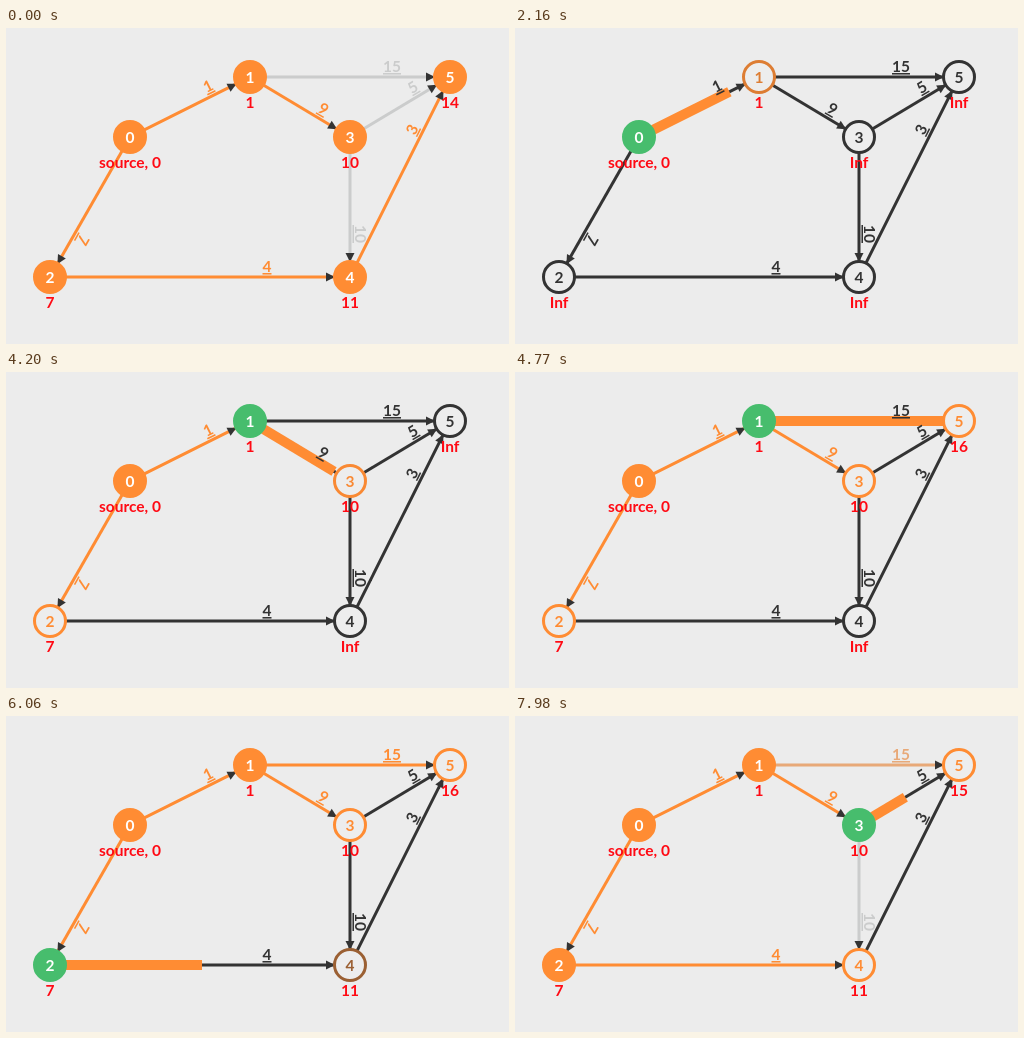
These frames come from a looping animation (503 px wide and 316 px high, 8 s). An HTML page:

```html
<!DOCTYPE html>
<html lang="en">
<head>
<meta charset="utf-8">
<title>Shortest paths</title>
<style>
  html, body { margin: 0; width: 100%; height: 100%; overflow: hidden; background: #ececec; }
  svg { display: block; width: 503px; height: 316px; }
  text { font: bold 15.5px Lato, "Open Sans", sans-serif; text-anchor: middle; }
  .weight { text-decoration: underline; }
  .dist { fill: #ff0a14; }
</style>
</head>
<body>
<svg id="stage" viewBox="0 0 503 316"></svg>
<script>
const LOOP = 8000, RESET = 930, SPAN = 400, RADIUS = 16;
const BG = [237, 237, 237], DARK = [51, 51, 51], ORANGE = [255, 140, 51];
const GREEN = [71, 189, 109], GREY = [203, 204, 204], WHITE = [255, 255, 255];

// inside, ring, digit
const LOOK = {
  plain: [BG, DARK, DARK],
  queued: [BG, ORANGE, ORANGE],
  active: [GREEN, GREEN, WHITE],
  done: [ORANGE, ORANGE, WHITE]
};

const points = [[124, 109], [244, 49], [44, 249], [344, 109], [344, 249], [444, 49]];
const links = [[0, 1, 1], [0, 2, 7], [1, 3, 9], [1, 5, 15], [2, 4, 4], [3, 4, 10], [3, 5, 5], [4, 5, 3]];
const finalDist = ["source, 0", 1, 7, 10, 11, 14];
const finalGrey = [3, 5, 6];

// node: [index, look]; grow: [edge, colour afterwards]; dist: [node, value]; fade: edge turned grey
const steps = [
  { at: 1400, node: [0, "active"] },
  { at: 1900, grow: [0, ORANGE], node: [1, "queued"], dist: [1, 1] },
  { at: 2430, grow: [1, ORANGE], node: [2, "queued"], dist: [2, 7] },
  { at: 2930, node: [0, "done"] },
  { at: 3390, node: [1, "active"] },
  { at: 3880, grow: [2, ORANGE], node: [3, "queued"], dist: [3, 10] },
  { at: 4380, grow: [3, ORANGE], node: [5, "queued"], dist: [5, 16] },
  { at: 4870, node: [1, "done"] },
  { at: 5360, node: [2, "active"] },
  { at: 5860, grow: [4, ORANGE], node: [4, "queued"], dist: [4, 11] },
  { at: 6350, node: [2, "done"] },
  { at: 6830, node: [3, "active"] },
  { at: 7300, grow: [5, GREY] },
  { at: 7788, grow: [6, ORANGE], dist: [5, 15], fade: 3 }
];

const stage = document.getElementById("stage");

function add(tag, attrs, parent = stage) {
  const el = document.createElementNS("http://www.w3.org/2000/svg", tag);
  for (const key in attrs) el.setAttribute(key, attrs[key]);
  return parent.appendChild(el);
}

const rgb = c => `rgb(${c.map(Math.round)})`;
const mix = (a, b, k) => a.map((v, i) => v + (b[i] - v) * k);
const ease = k => k <= 0 ? 0 : k >= 1 ? 1 : k < 0.5 ? 4 * k ** 3 : 1 - 4 * (1 - k) ** 3;

// Each edge is drawn along its own x axis, starting at the rim of its first node.
const edges = links.map(([from, to, weight]) => {
  const [x, y] = points[from], [u, v] = points[to];
  const angle = Math.atan2(v - y, u - x);
  const length = Math.hypot(u - x, v - y) - 2 * RADIUS;
  const g = add("g", {
    transform: `translate(${x} ${y}) rotate(${angle * 180 / Math.PI}) translate(${RADIUS} 0)`
  });
  const line = add("path", { d: `M0 0H${length}`, "stroke-width": 3 }, g);
  add("path", { d: "M-8 -4.5L1 0L-8 4.5Z", transform: `translate(${length} 0)`, fill: "#333" }, g);
  const bar = add("path", { stroke: rgb(ORANGE), "stroke-width": 10 }, g);
  const label = add("text", { class: "weight", x: length * 0.75, y: -5 }, g);
  label.textContent = weight;
  return { line, bar, label, length };
});

const nodes = points.map(([x, y], i) => {
  const disc = add("circle", { cx: x, cy: y, r: 15.5, "stroke-width": 3 });
  const digit = add("text", { x, y: y + 5.5 });
  digit.textContent = i;
  return { disc, digit };
});

const dists = points.map(([x, y]) => add("text", { class: "dist", x, y: y + 31 }));

function stateAt(t) {
  if (t < RESET) return {
    looks: points.map(() => LOOK.done),
    colours: links.map((_, i) => finalGrey.includes(i) ? GREY : ORANGE),
    bars: links.map(() => 0),
    values: finalDist
  };
  const looks = points.map((_, i) => i ? LOOK.plain : LOOK.queued);
  const colours = links.map(() => DARK);
  const bars = links.map(() => 0);
  const values = points.map((_, i) => i ? "Inf" : "source, 0");
  for (const { at, node, grow, dist, fade } of steps) {
    if (t < at) break;
    const k = ease((t - at) / SPAN);
    if (node) {
      const [i, look] = node;
      looks[i] = looks[i].map((c, j) => mix(c, LOOK[look][j], k));
    }
    if (grow) {
      const [i, after] = grow;
      if (k < 1) bars[i] = k;
      else colours[i] = after;
    }
    if (dist) values[dist[0]] = dist[1];
    if (fade !== undefined) colours[fade] = mix(colours[fade], GREY, k);
  }
  return { looks, colours, bars, values };
}

function draw(t) {
  const { looks, colours, bars, values } = stateAt(t);
  edges.forEach(({ line, bar, label, length }, i) => {
    const colour = rgb(colours[i]);
    line.setAttribute("stroke", colour);
    label.setAttribute("fill", colour);
    bar.setAttribute("d", `M0 0H${length * bars[i]}`);
  });
  nodes.forEach(({ disc, digit }, i) => {
    const [inside, ring, text] = looks[i].map(rgb);
    disc.setAttribute("fill", inside);
    disc.setAttribute("stroke", ring);
    digit.setAttribute("fill", text);
    dists[i].textContent = values[i];
  });
}

const start = performance.now();
function tick() {
  draw((performance.now() - start) % LOOP);
  requestAnimationFrame(tick);
}
tick();
</script>
</body>
</html>
```
